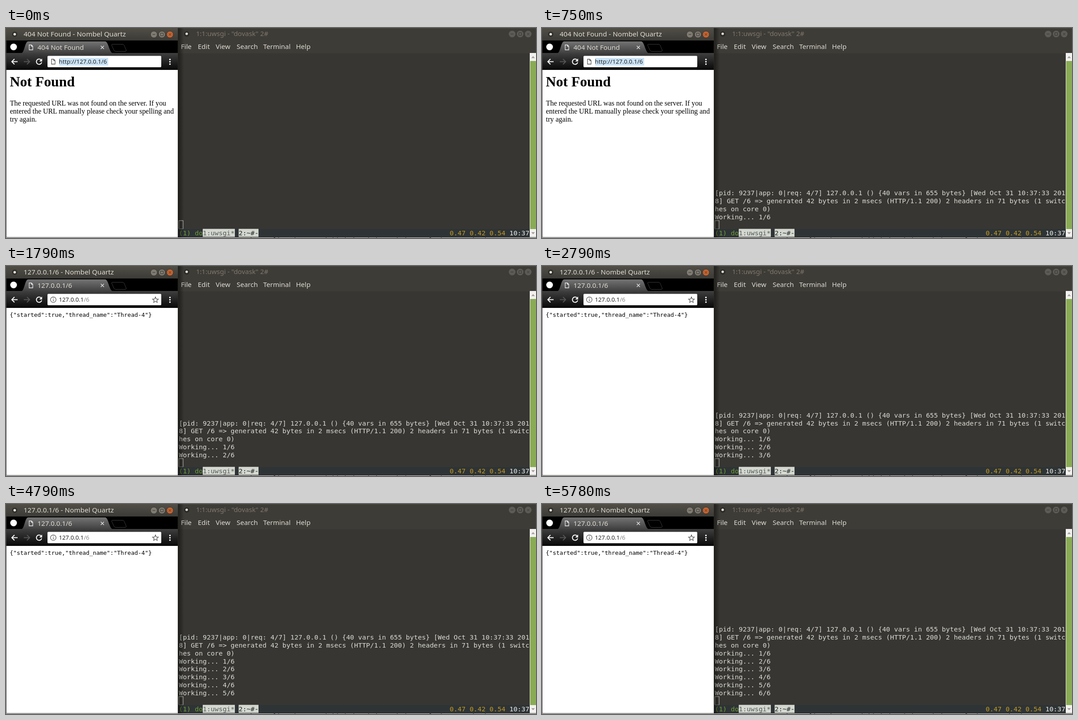
Recreate the animation shown at these times as an HTML page. Size 1188x471 px, loop 7.97 s.

```html
<!DOCTYPE html>
<html lang="en">
<head>
<meta charset="utf-8">
<title>Background thread demo</title>
<style>
  html, body { margin: 0; width: 100%; height: 100%; overflow: hidden; background: #383632; }
  svg { display: block; width: 1188px; height: 471px; }
  text { white-space: pre; }
  .ui { font: 500 15px "Noto Sans", "Open Sans", sans-serif; fill: #dfdbd2; }
  .title { font-size: 15.3px; }
  .url { font-size: 13.2px; fill: #222; }
  .serif { font: 15.9px "Liberation Serif", serif; }
  .heading { font-size: 31.75px; font-weight: bold; }
  .json { font: 12.9px "DejaVu Sans Mono", monospace; }
  .term { font: 14.83px "DejaVu Sans Mono", monospace; fill: #dadcd5; }
  .line { fill: none; stroke: currentColor; }
</style>
</head>
<body>
<svg viewBox="0 0 1188 471">
  <defs>
    <linearGradient id="titleBar" x2="0" y2="1">
      <stop stop-color="#504e46"/><stop offset="1" stop-color="#3c3b37"/>
    </linearGradient>
    <linearGradient id="tab" x2="0" y2="1">
      <stop stop-color="#747474"/><stop offset="1" stop-color="#3f3f3f"/>
    </linearGradient>
    <linearGradient id="toolbar" x2="0" y2="1">
      <stop stop-color="#3f3f3f"/><stop offset="1" stop-color="#080808"/>
    </linearGradient>
    <linearGradient id="shadow">
      <stop stop-opacity=".5"/><stop offset="1" stop-opacity="0"/>
    </linearGradient>
    <g id="page" class="line" stroke-width="1.3">
      <path d="M-4-5.5H1L4-2.5V5.5H-4ZM1-5.5V-2.5H4"/>
    </g>
    <g id="buttons" class="line">
      <path d="M-3 0H3M15-3H21V3H15ZM33.5-2.5L38.5 2.5M38.5-2.5L33.5 2.5"/>
    </g>
  </defs>

  <!-- Terminal window -->
  <rect x="385" width="803" height="471" fill="#383632"/>
  <rect x="385" width="803" height="57" fill="#3d3c37"/>
  <rect x="385" width="803" height="1" fill="#4b4943"/>
  <circle cx="405" cy="13.5" r="6" fill="#2b2a27"/>
  <circle cx="405" cy="13" r="2.8" fill="#dedbd2"/>
  <text class="ui" x="426" y="18" style="fill:#80776d">1:1:uwsgi - "dovask" 2#</text>
  <g fill="#5d5b55">
    <circle cx="1134.5" cy="13.5" r="7.5"/><circle cx="1152.5" cy="13.5" r="7.5"/><circle cx="1170.5" cy="13.5" r="7.5"/>
  </g>
  <use href="#buttons" x="1134.5" y="13.5" color="#33322e"/>
  <g class="ui">
    <text x="392" y="47">File</text><text x="430" y="47">Edit</text>
    <text x="470" y="47">View</text><text x="517" y="47">Search</text>
    <text x="576.5" y="47">Terminal</text><text x="650" y="47">Help</text>
  </g>
  <g id="log" class="term"></g>
  <rect class="line" x="387.5" y="432" width="9.5" height="18.5" color="#d5d8d0"/>

  <rect x="387" y="450.5" width="787" height="18.5" fill="#2e3436"/>
  <rect x="441" y="450.5" width="72" height="18" fill="#d3d7cf"/>
  <rect x="521.5" y="450.5" width="44.5" height="18" fill="#d3d7cf"/>
  <g class="term">
    <text x="387.5" y="465" style="fill:#6f9d35">(1) do</text>
    <text x="441" y="465" style="fill:#555b59">1:uwsgi*</text>
    <text x="521.5" y="465" style="fill:#252a2c">2:~#-</text>
    <text x="994.5" y="465" style="fill:#c49a20">0.47 0.42 0.54</text>
    <text x="1128.5" y="465" style="fill:#eeeeec">10:37</text>
  </g>
  <rect x="385" y="469" width="803" height="1" fill="#33322f"/>

  <rect x="1174" y="56" width="14" height="413" fill="#f2f1ef"/>
  <rect x="1175" y="74" width="13" height="377" fill="#8aab55"/>
  <path d="M1177.500 67.500L1181.500 63L1185.500 67.500ZM1177.500 458L1181.500 462.500L1185.500 458Z" fill="#a09d98"/>
  <rect x="385" width="14" height="470" fill="url(#shadow)"/>

  <!-- Window behind, showing below both -->
  <rect y="470" width="1188" height="1" fill="#e4e4e2"/>
  <text class="json" x="545" y="479.5" fill="#444">just a line that runs behind the window and shows only its top edge here</text>

  <!-- Browser window -->
  <rect width="385.5" height="470" fill="#3c3b37"/>
  <rect width="385" height="28" fill="url(#titleBar)"/>
  <circle cx="19.5" cy="14" r="6" fill="#302f2b"/>
  <circle cx="19.5" cy="14" r="2.8" fill="#efebdf"/>
  <g fill="#7f7b72" stroke="#37352f">
    <circle cx="331.5" cy="14.5" r="7.5"/><circle cx="349.5" cy="14.5" r="7.5"/><circle cx="367.5" cy="14.5" r="7.5" fill="#c4622f"/>
  </g>
  <use href="#buttons" x="331.5" y="14.5" color="#36342f"/>

  <rect x="1" y="28" width="384" height="29" fill="#000"/>
  <circle cx="17" cy="42.5" r="7.5" fill="#fff"/>
  <path d="M34 57C42 55 42 30 50 30H222C230 30 231 55 240 57Z" fill="url(#tab)"/>
  <path class="line" d="M239 36.500H261Q264 36.500 265 39L269.500 50Q270 52.500 267 52.500H246Q243 52.500 242 50L237 39Q236 36.500 239 36.500Z" color="#3b3b3b"/>
  <use href="#page" x="56" y="43.5" color="#eee"/>
  <path class="line" d="M212.500 40L219.500 47M219.500 40L212.500 47" color="#ddd" stroke-width="1.5"/>

  <rect x="1" y="56" width="384" height="38" fill="url(#toolbar)"/>
  <g class="line" stroke-width="2" color="#fff">
    <path d="M26 75.500H13M19 69.500L13 75.500L19 81.500"/>
    <path d="M40 75.500H53M47 69.500L53 75.500L47 81.500" color="#555"/>
    <path d="M79 72A6 6 0 1 0 80 77"/>
  </g>
  <path d="M81 68.500V75H74.500Z" fill="#fff"/>
  <g fill="#fff">
    <circle cx="367.5" cy="70.5" r="1.8"/><circle cx="367.5" cy="75.8" r="1.8"/><circle cx="367.5" cy="81" r="1.8"/>
  </g>
  <rect x="93" y="62.5" width="255" height="25.5" rx="2" fill="#fff"/>
  <rect x="1" y="94" width="384" height="375" fill="#fff"/>

  <g id="missing">
    <text class="ui title" x="39.5" y="18.5">404 Not Found - Nombel Quartz</text>
    <text class="ui" x="70.5" y="48.5">404 Not Found</text>
    <use href="#page" x="106" y="75.5" color="#555"/>
    <rect x="119" y="67" width="110" height="17" fill="#cbe4f8"/>
    <text class="ui url" x="118.5" y="80">http://127.0.0.1/6</text>
    <text class="serif heading" x="8.5" y="131">Not Found</text>
    <g class="serif">
      <text x="8.8" y="174">The requested URL was not found on the server. If you</text>
      <text x="8.8" y="191.8">entered the URL manually please check your spelling and</text>
      <text x="8.8" y="209.5">try again.</text>
    </g>
  </g>
  <g id="started">
    <text class="ui title" x="39.5" y="18.5">127.0.0.1/6 - Nombel Quartz</text>
    <text class="ui" x="70.5" y="48.5">127.0.0.1/6</text>
    <g class="line" color="#555" stroke-width="1.3">
      <circle cx="106" cy="75.5" r="6.2"/>
      <path d="M106 74.500V79M106 71.500V73"/>
      <path d="M335 69.500L336.800 73.800L341.500 74.200L338 77.200L339 81.700L335 79.300L331 81.700L332 77.200L328.500 74.200L333.200 73.800Z"/>
    </g>
    <text class="ui url" x="118.5" y="80">127.0.0.1<tspan fill="#888">/6</tspan></text>
    <text class="json" x="8.5" y="114">{"started":true,"thread_name":"Thread-4"}</text>
  </g>
</svg>
<script>
const LOOP = 7970;
const RESPONSE_AT = 790;
const WORK_TIMES = [750, 1790, 2790, 3790, 4790, 5780];
const LINE_HEIGHT = 17.87;
const LAST_BASELINE = 429;
const REQUEST_LOG = [
  "[pid: 9237|app: 0|req: 4/7] 127.0.0.1 () {40 vars in 655 bytes} [Wed Oct 31 10:37:33 201",
  "8] GET /6 => generated 42 bytes in 2 msecs (HTTP/1.1 200) 2 headers in 71 bytes (1 switc",
  "hes on core 0)"
];
const byId = id => document.getElementById(id);
const log = byId("log");
let shownSteps = 0;

function show(id, visible) {
  byId(id).style.display = visible ? "" : "none";
}

function drawLog(steps) {
  const work = Array.from({ length: steps }, (_, i) => `Working... ${i + 1}/6`);
  const lines = steps ? [...REQUEST_LOG, ...work] : [];
  log.replaceChildren(...lines.map((line, i) => {
    const text = document.createElementNS(log.namespaceURI, "text");
    text.setAttribute("x", 387.5);
    text.setAttribute("y", LAST_BASELINE - (lines.length - 1 - i) * LINE_HEIGHT);
    text.textContent = line;
    return text;
  }));
}

function render(now) {
  const t = now % LOOP;
  const steps = WORK_TIMES.filter(time => t >= time).length;
  if (steps !== shownSteps) drawLog(shownSteps = steps);
  show("missing", t < RESPONSE_AT);
  show("started", t >= RESPONSE_AT);
}

const start = performance.now();
function tick() {
  render(performance.now() - start);
  requestAnimationFrame(tick);
}
tick();
</script>
</body>
</html>
```
